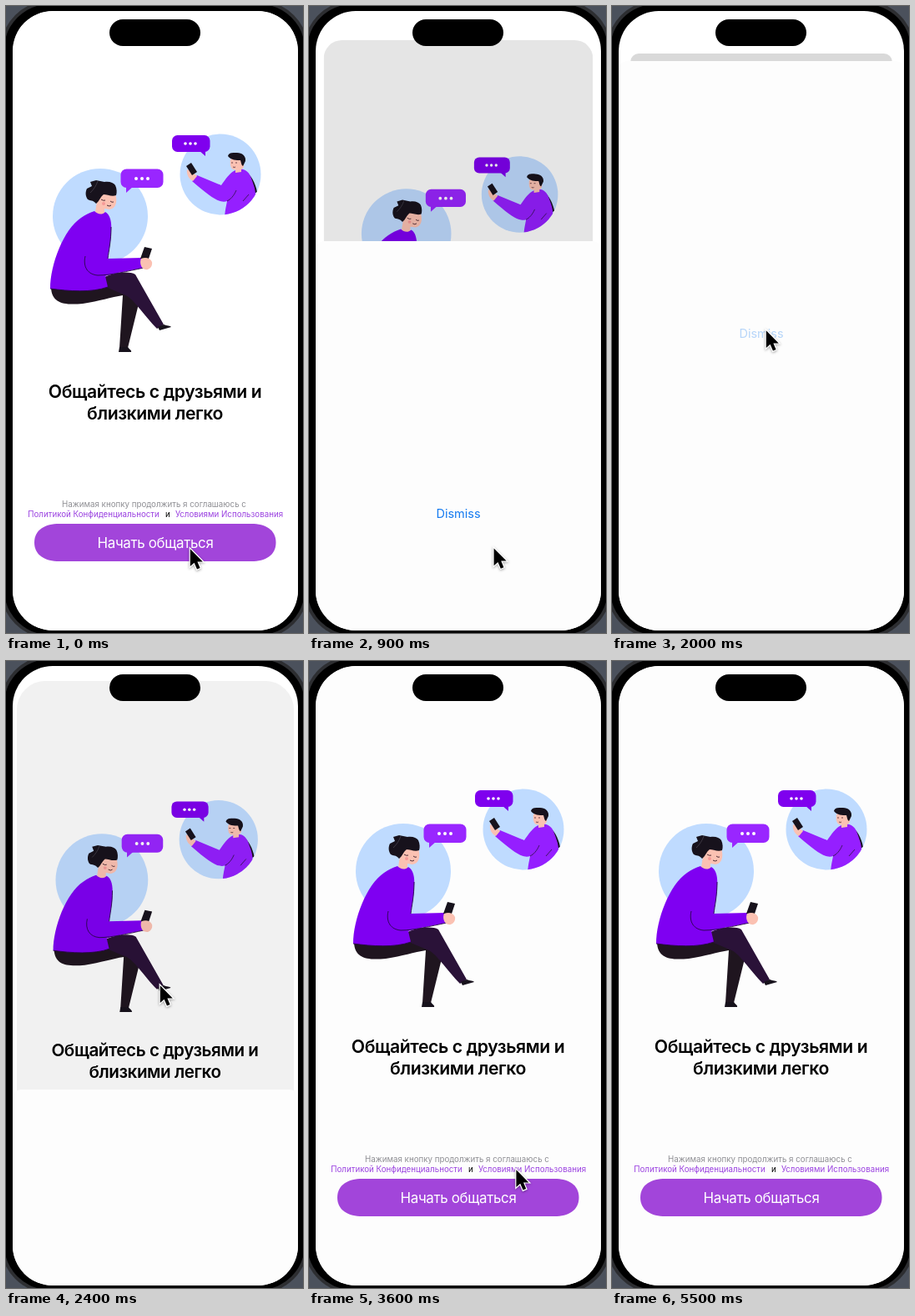
An HTML page for the animation above (8000 ms loop, 356 px wide and 752 px high).

```html
<!DOCTYPE html>
<html lang="ru">
<head>
<meta charset="utf-8">
<title>Onboarding</title>
<style>
  html, body { margin: 0; width: 100%; height: 100%; overflow: hidden; background: #4b515c; }
  svg { display: block; width: 356px; height: 752px; font-family: Inter, Roboto, sans-serif; }
  text { text-anchor: middle; }
  .title { font-size: 21.2px; font-weight: 600; letter-spacing: -.02em; }
  .note { font-size: 9.75px; fill: #8e8e93; }
  .link { fill: #9a40e0; }
  .cta { font-size: 16.9px; letter-spacing: -.02em; fill: #fff; }
  #dismiss { font-size: 14.5px; fill: #147af0; }
  #cursor { filter: drop-shadow(0 1.5px 1.5px rgba(0, 0, 0, .35)); }
</style>
</head>
<body>
<svg viewBox="0 0 356 752">
  <defs>
    <clipPath id="screenClip"><rect x="8" y="6" width="342" height="743" rx="48"/></clipPath>
    <clipPath id="cardClip"><rect id="cardShape" x="8" y="6" width="342" height="743"/></clipPath>
    <clipPath id="friendClip"><circle cx="257" cy="202" r="48.5"/></clipPath>
  </defs>

  <rect x="-4" y="-4" width="364" height="760" rx="56" fill="#000" stroke="#2d2e31" stroke-width="4"/>

  <g clip-path="url(#screenClip)">
    <rect width="356" height="752" fill="#fff"/>

    <g id="card">
      <g clip-path="url(#cardClip)">
        <rect id="page" x="8" y="6" width="342" height="743"/>

        <!-- friend -->
        <circle cx="257" cy="202" r="48.5" fill="#bfdbff"/>
        <g clip-path="url(#friendClip)">
          <path d="M286 198C294 202 299 213 301 223L291 229Z" fill="#17121c"/>
          <path d="M275 197C283 193 290 197 293 204C296 212 299 219 299 226L303 235L290 256H262C262 247 264 240 265 234C257 237 247 231 223 210L229 203L258 215C263 208 268 200 275 197Z" fill="#951fff"/>
          <path d="M265 234C269 232 273 228 276 221M291 226L284 234" fill="none" stroke="#2a1240" stroke-width=".8"/>
        </g>
        <path d="M269 184C275 181 283 183 285 188C286 193 284 195 282 196L282 199L275 200L275 196C270 197 268 192 269 184Z" fill="#fbc1b2"/>
        <path d="M266 180C267 175 273 176 277 176C283 176 288 180 287 186L284 192C282 191 282 188 281 185C276 185 270 185 266 180Z" fill="#17121c"/>
        <path d="M270 188h2M275 188h2M272 193q2 1 3 0" fill="none" stroke="#4a2430" stroke-width=".8"/>
        <path d="M217 196L222 198 229 204 224 210C220 208 216 203 217 196Z" fill="#fbc1b2"/>
        <path d="M216 192L222 188 229 199 223 203Z" fill="#17121c"/>

        <!-- woman -->
        <circle cx="113" cy="252" r="57" fill="#bfdbff"/>
        <path d="M54 338C55 357 70 359 92 357C112 354 126 349 140 347L136 410H146L161 349 150 328 110 325Z" fill="#1f151f"/>
        <path d="M136 409H146C148 412 151 413 150 415H135Z" fill="#17121c"/>
        <path d="M118 325C132 319 148 318 155 322L189 382 181 387C166 372 151 348 141 346L122 338Z" fill="#2a1238"/>
        <path d="M182 385L189 382C193 384 197 383 198 385L184 389Z" fill="#17121c"/>
        <path d="M110 228C115 224 122 223 131 225C134 234 132 243 124 244L118 243 118 251C114 254 108 251 107 247Z" fill="#fbc1b2"/>
        <path d="M97 219L103 216 101 211 108 209 118 211C124 210 129 212 131 215C133 219 133 224 132 227C127 229 121 226 117 226C113 229 112 234 108 237C104 232 101 234 98 232C95 228 95 223 97 219Z" fill="#17121c"/>
        <path d="M101 224C105 220 108 216 110 210" fill="none" stroke="#55505c" stroke-width=".6"/>
        <path d="M114 232q3 2 5 1M125 234q2 2 4 1M121 239q3 2 5 0" fill="none" stroke="#3b1c28" stroke-width=".9"/>
        <circle cx="117" cy="237" r="2" fill="#f59a98"/>
        <path d="M106 246C110 250 115 251 119 247C125 250 127 260 126 270C126 282 123 294 122 303L163 302 165 314C150 317 132 320 119 324L122 337C103 344 75 342 53 339C53 310 69 268 90 254C96 250 100 248 106 246Z" fill="#7f00f2"/>
        <path d="M95 300C92 313 98 322 110 323C126 323 146 318 165 314M53 339C75 342 103 344 122 337M126 265C126 282 123 294 122 303" fill="none" stroke="#260846" stroke-width=".9"/>
        <path d="M166 289L175 291 170 306 161 303Z" fill="#17121c"/>
        <path d="M162 303C167 301 173 302 175 307C176 312 172 317 167 316C161 315 160 306 162 303Z" fill="#fbc1b2"/>

        <!-- speech bubbles -->
        <path d="M231 173H239L239 180Z" fill="#7f00ee"/>
        <rect x="199" y="155" width="45.5" height="20" rx="6.5" fill="#7f00ee"/>
        <path d="M144 216H153L144 224Z" fill="#9926ff"/>
        <rect x="137.5" y="195.5" width="51" height="22.5" rx="7" fill="#9926ff"/>
        <g fill="#fff">
          <circle cx="215" cy="165" r="1.8"/><circle cx="221" cy="165" r="1.8"/><circle cx="227" cy="165" r="1.8"/>
          <circle cx="156" cy="207" r="2"/><circle cx="163" cy="207" r="2"/><circle cx="170" cy="207" r="2"/>
        </g>

        <text class="title" x="178.5" y="470">Общайтесь с друзьями и</text>
        <text class="title" x="178.5" y="496">близкими легко</text>
        <text class="note" x="177.5" y="601">Нажимая кнопку продолжить я соглашаюсь с</text>
        <text class="note link" x="105" y="612.5">Политикой Конфиденциальности</text>
        <text class="note" style="fill:#000" x="194" y="612.5">и</text>
        <text class="note link" x="267.5" y="612.5">Условиями Использования</text>
        <path d="M34 643.5C34 628 47 621 64 621H294C311 621 323.5 628 323.5 643.5S311 666 294 666H64C47 666 34 659 34 643.5Z" fill="#a245da"/>
        <text class="cta" x="179" y="650">Начать общаться</text>

        <rect id="dim" x="8" y="6" width="342" height="743" fill="#000"/>
      </g>
    </g>

    <g id="sheet">
      <rect x="8" width="342" height="700" rx="10" fill="#fdfdfd"/>
      <text id="dismiss" x="179" y="332">Dismiss</text>
    </g>
  </g>

  <rect x="124" y="16" width="109" height="32" rx="16"/>
  <path id="cursor" d="M.8 1.2V22L5.6 17.8 9 25.6 12.6 24 9.4 16.4H15.8Z" stroke="#fff" stroke-width="2.4" paint-order="stroke"/>
</svg>

<script>
const LOOP = 8000, OPEN = 720, CLOSE = 2215, HIDE = 5450;
const $ = id => document.getElementById(id);
const [card, cardShape, page, dim, sheet, dismiss, cursor] =
  ['card', 'cardShape', 'page', 'dim', 'sheet', 'dismiss', 'cursor'].map($);

// time, x, y of the pointer tip
const path = [
  [0, 220, 650], [1100, 221, 649], [1300, 213, 650], [1500, 190, 470], [1650, 183, 380],
  [2000, 184, 388], [2420, 184, 388], [2900, 163, 582], [3050, 163, 586], [3400, 225, 606],
  [3800, 270, 612], [4050, 270, 612], [4400, 257, 608], [4900, 215, 609], [5000, 186, 612],
  [5120, 186, 612], [5200, 50, 608], [5320, 50, 608], [HIDE, 21, 612]
];

// critically damped spring from 0 to 1
function spring(ms, rate) {
  const x = Math.max(0, ms) / 1000 * rate;
  return 1 - (1 + x) * Math.exp(-x);
}

function pointerAt(t) {
  const i = path.findIndex(p => p[0] > t);
  if (i < 0) return path[path.length - 1].slice(1);
  const [a, b] = [path[i - 1], path[i]];
  const k = (t - a[0]) / (b[0] - a[0]);
  return [a[1] + (b[1] - a[1]) * k, a[2] + (b[2] - a[2]) * k];
}

function render(t) {
  let p = t < CLOSE ? spring(t - OPEN, 13.1) : 1 - spring(t - CLOSE, 12);
  if (p < .003) p = 0;
  const scale = 1 - .082 * p;
  card.setAttribute('transform', `translate(179 ${6 + 51 * p}) scale(${scale}) translate(-179 -6)`);
  cardShape.setAttribute('rx', (48 - 38 * p) / scale);
  page.setAttribute('fill', t < OPEN ? '#fff' : '#fdfdfd');
  dim.setAttribute('opacity', .14 * p);
  sheet.setAttribute('transform', `translate(0 ${752 - 686 * p})`);
  dismiss.setAttribute('opacity', t >= 1980 && t < 2150 ? .3 : 1);
  cursor.setAttribute('transform', `translate(${pointerAt(t)})`);
  cursor.setAttribute('visibility', t < HIDE ? 'visible' : 'hidden');
}

const start = performance.now();
function tick() {
  render((performance.now() - start) % LOOP);
  requestAnimationFrame(tick);
}
tick();
</script>
</body>
</html>
```
